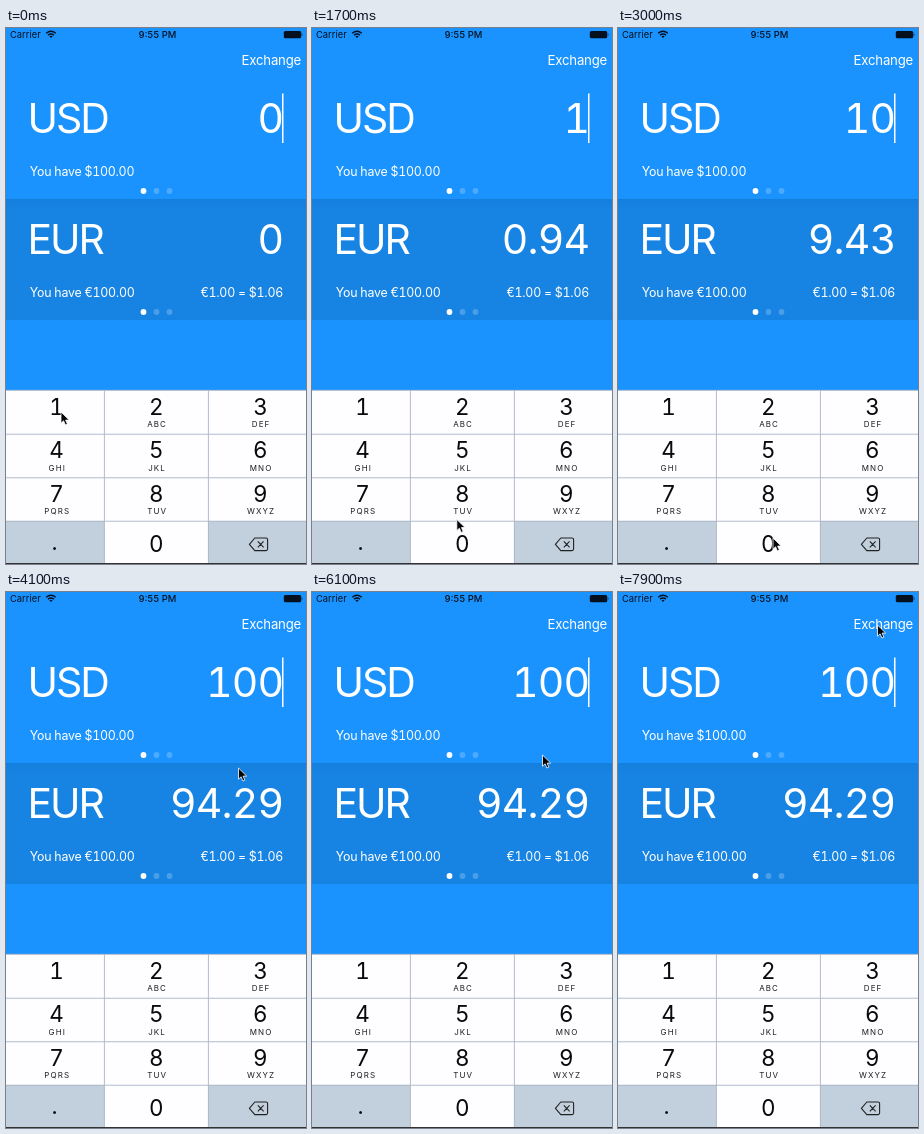
An HTML page that plays this animation: 300x536 px, repeating every 8 s.

```html
<!DOCTYPE html>
<html lang="en">
<head>
<meta charset="utf-8">
<title>Currency exchange</title>
<style>
html, body { margin: 0; width: 100%; height: 100%; overflow: hidden; background: #1a93ff; }
svg { display: block; width: 300px; height: 536px; font-family: Inter, Roboto, sans-serif; font-variant-numeric: tabular-nums; cursor: none; }
.status { font-size: 9.4px; fill: #04101e; }
.amount, .code { font-size: 41px; letter-spacing: -.8px; fill: #fff; }
.code { letter-spacing: -2px; }
.note { font-size: 12.4px; letter-spacing: -.25px; fill: #fff; }
.nav { font-size: 13.2px; letter-spacing: -.2px; fill: #fff; }
.digit { font-size: 22.5px; text-anchor: middle; fill: #0a0a0a; }
.abc { font-size: 8px; letter-spacing: 1.1px; text-anchor: middle; fill: #1c1c1c; }
.end { text-anchor: end; }
.mid { text-anchor: middle; }
</style>
</head>
<body>
<svg id="stage" viewBox="0 0 300 536" xmlns="http://www.w3.org/2000/svg">
  <defs>
    <linearGradient id="shade" x1="0" y1="0" x2="0" y2="1">
      <stop offset="0" stop-color="#157fde"/>
      <stop offset=".1" stop-color="#1783e2"/>
      <stop offset=".9" stop-color="#1784e3"/>
      <stop offset="1" stop-color="#1682e1"/>
    </linearGradient>
  </defs>
  <rect width="300" height="536" fill="#1a93ff"/>
  <rect y="171" width="300" height="121" fill="url(#shade)"/>

  <text class="status" x="4" y="10">Carrier</text>
  <g fill="none" stroke="#04101e" stroke-width="1.4">
    <path d="M40.2 5.3Q45 1.2 49.8 5.3M42 7.2Q45 4.7 48 7.2"/>
    <path d="M43.4 8.3Q45 7 46.6 8.3L45 10Z" fill="#04101e" stroke="none"/>
  </g>
  <text class="status mid" x="151.5" y="10" font-weight="500">9:55 PM</text>
  <rect x="277.8" y="2.9" width="17.4" height="7.4" rx="1.5" fill="#04101e"/>
  <path d="M295.8 5.2q1.6 1.5 0 3z" fill="#04101e"/>
  <text class="nav end" x="295.1" y="37">Exchange</text>

  <text class="code" x="21.4" y="105.3">USD</text>
  <text class="amount end" id="from" x="277.3" y="105.3">0</text>
  <text class="note" x="23.8" y="147.5">You have $100.00</text>
  <rect x="276" y="65.5" width="1.5" height="49.5" fill="#fff"/>

  <text class="code" x="21.4" y="226.4">EUR</text>
  <text class="amount end" id="to" x="277.3" y="226.4">0</text>
  <text class="note" x="23.8" y="268.6">You have €100.00</text>
  <text class="note end" x="277" y="268.6">€1.00 = $1.06</text>
  <g id="dots" fill="#fff"></g>

  <g id="pad"></g>
  <path d="M248.8 510H260q1.6 0 1.6 1.6V521q0 1.6-1.6 1.6H248.8L243.4 516.3ZM251.8 513.3l5.8 6M257.6 513.3l-5.8 6"
    fill="none" stroke="#222" stroke-width="1.1" stroke-linejoin="round"/>
  <rect y="535" width="300" height="1" fill="#333"/>

  <g id="mouse">
    <circle id="ring" r="17.5" fill="none" stroke="#111" stroke-width="1"/>
    <path d="M0 0V11.2L2.6 8.8L4.4 13L6.4 12.1L4.6 8.1H8.2Z" fill="#050505" stroke="#fff" stroke-width=".8"/>
  </g>
</svg>
<script>
const LOOP = 8000, STEP = 100;
const $ = id => document.getElementById(id);
const GREY = '#c1d0dc', WHITE = '#fefdff';

function add(parent, tag, attrs, text) {
  const el = document.createElementNS('http://www.w3.org/2000/svg', tag);
  for (const k in attrs) el.setAttribute(k, attrs[k]);
  if (text) el.textContent = text;
  parent.appendChild(el);
  return el;
}

for (const y of [163, 284])
  [137.5, 150.5, 163.5].forEach((x, i) =>
    add($('dots'), 'circle', { cx: x, cy: y, r: 2.9, opacity: i ? .22 : 1 }));

const colEdge = [0, 98.4, 202.4, 300];
const rowEdge = [362.3, 406.2, 449.8, 493.2, 536];
const colMid = [50.5, 150.3, 254.3];
const baseline = [386.6, 430.3, 474, 523.7];
const labels = ['1', '2', '3', '4', '5', '6', '7', '8', '9', '.', '0', ''];
const letters = ['', 'ABC', 'DEF', 'GHI', 'JKL', 'MNO', 'PQRS', 'TUV', 'WXYZ'];
const keys = {};
labels.forEach((label, i) => {
  const c = i % 3, r = Math.floor(i / 3), base = baseline[r];
  keys[label] = add($('pad'), 'rect', {
    x: colEdge[c], y: rowEdge[r],
    width: colEdge[c + 1] - colEdge[c], height: rowEdge[r + 1] - rowEdge[r],
    fill: i === 9 || i === 11 ? GREY : WHITE
  });
  const dot = label === '.';
  add($('pad'), 'text', { class: 'digit', x: colMid[c] - (dot ? 2 : 0), y: dot ? 521.6 : base }, label);
  add($('pad'), 'text', { class: 'abc', x: colMid[c] + .8, y: base + 12.4 }, letters[i]);
});
const lines = colEdge.slice(1, 3).map(x => `M${x} 362V536`)
  .concat(rowEdge.slice(0, 4).map(y => `M0 ${y}H300`));
add($('pad'), 'path', { d: lines.join(''), stroke: '#b4b7bf', 'stroke-width': .8, fill: 'none' });

// Mouse presses: key, down, up
const presses = [['1', 300, 500], ['0', 2200, 2500], ['0', 3300, 3500]];
// Pointer stops: time, x, y
const path = [
  [0, 55, 384], [1200, 55, 384], [1800, 152, 500], [2100, 155, 510],
  [3700, 155, 510], [4100, 232.5, 176], [4700, 230.5, 163],
  [6500, 230.5, 163], [7300, 259.5, 33], [LOOP, 259.5, 33]
];
const ease = u => u * u * (3 - 2 * u);

function pointer(t) {
  const i = path.findIndex((p, n) => n && t <= p[0]);
  const [t0, x0, y0] = path[i - 1], [t1, x1, y1] = path[i];
  const u = ease((t - t0) / (t1 - t0));
  return [x0 + (x1 - x0) * u, y0 + (y1 - y0) * u];
}

function draw(time) {
  const t = Math.floor((time % LOOP) / STEP) * STEP;
  const typed = presses.filter(p => t >= p[2]).map(p => p[0]).join('');
  $('from').textContent = typed || '0';
  $('to').textContent = typed ? (typed * .9429).toFixed(2) : '0';
  const held = presses.find(p => t >= p[1] && t < p[2]);
  for (const k of ['0', '1']) keys[k].setAttribute('fill', held && held[0] === k ? GREY : WHITE);
  $('ring').setAttribute('visibility', held ? 'visible' : 'hidden');
  $('mouse').setAttribute('transform', `translate(${pointer(t)})`);
}

function tick() {
  draw(performance.now());
  requestAnimationFrame(tick);
}
tick();
</script>
</body>
</html>
```
